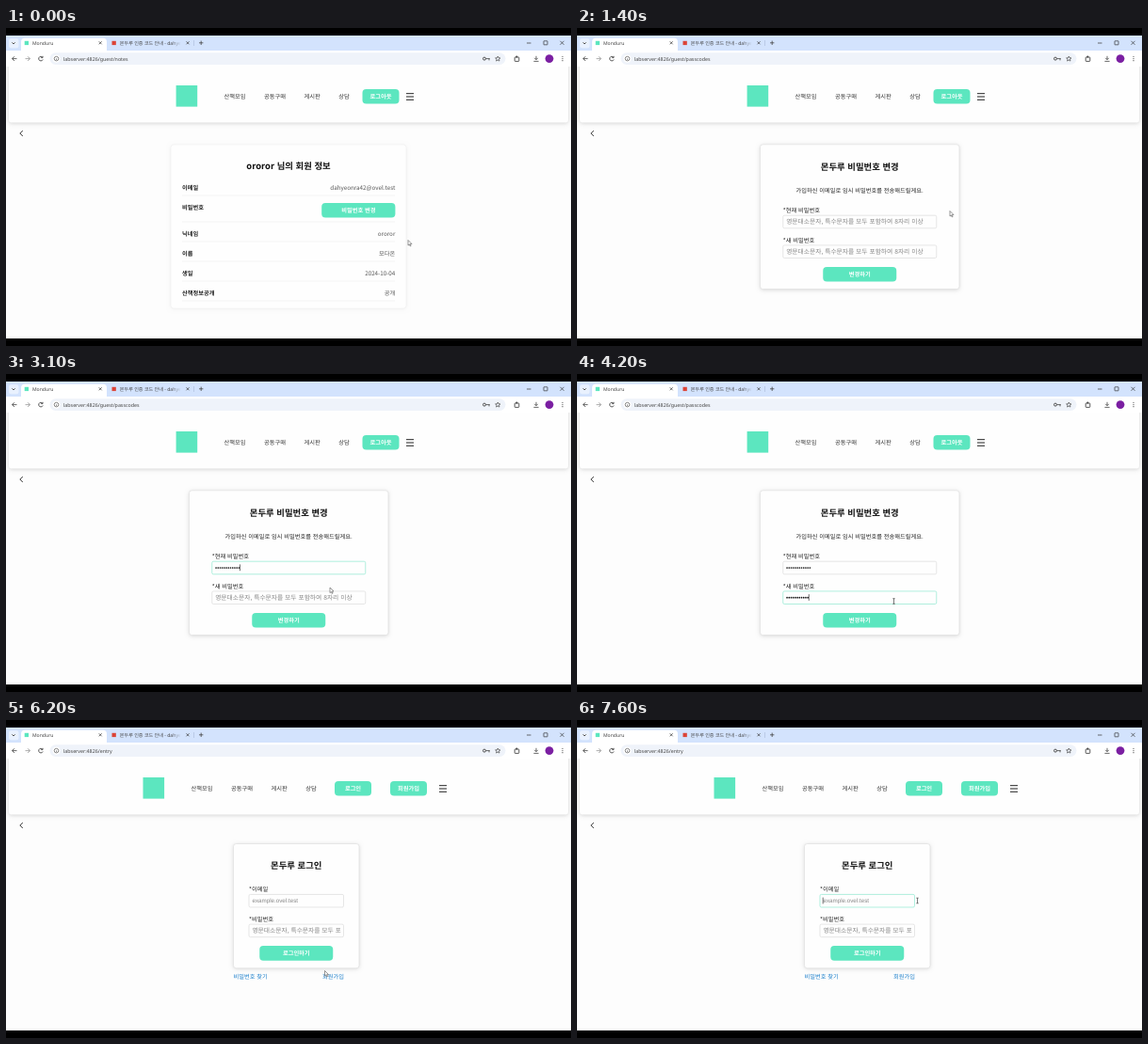
An HTML page with a canvas for the animation above (7700 ms loop, 600 by 338 pixels).

```html
<!DOCTYPE html>
<html lang="ko">
<head>
<meta charset="utf-8">
<style>
html, body { margin: 0; width: 100%; height: 100%; overflow: hidden; background: #000; }
canvas { display: block; width: 600px; height: 338px; }
</style>
</head>
<body>
<canvas id="stage"></canvas>
<script>
const W = 600, H = 338, LOOP = 7700, STEP = 100;
const KR = '"Noto Sans CJK KR", "Noto Sans CJK", sans-serif';
const UI = '"Noto Sans", "Noto Sans CJK KR", sans-serif';
const ARIAL = '"Liberation Sans", Arial, sans-serif';
const MINT = '#5ce6bf', FOCUS = '#8fe8d0', DARK = '#444', BASE = 6.25;
const BRAND = '몬두루';
const HINT = '영문대소문자, 특수문자를 모두 포함하여 8자리 이상';
const PAGE_AT = { password: 1200, login: 6200 };
const CLICK = { current: 2000, fresh: 3400, submit: 4900, email: 7300 };

const canvas = document.getElementById('stage');
const ctx = canvas.getContext('2d');
const dpr = window.devicePixelRatio || 1;
canvas.width = W * dpr;
canvas.height = H * dpr;

// Pointer moves: start, end, target x, target y
const HOME = [427, 225.5];
const MOVES = [
  [100, 700, 396, 194.5],
  [1600, CLICK.current, 345, 206],
  [2700, 3100, 344, 227],
  [3100, CLICK.fresh, 336.5, 241.5],
  [4300, 4800, 348, 258],
  [5100, 6000, 338.5, 266.5],
  [6900, CLICK.email, 361.5, 192]
];

const clamp = (v, max = 1) => Math.max(0, Math.min(max, v));
const ease = u => u * u * (3 - 2 * u);

function text(s, x, cy, o = {}) {
  const size = o.size || BASE;
  ctx.font = `${o.weight || 400} ${size}px ${o.font || KR}`;
  ctx.textAlign = o.align || 'left';
  ctx.fillStyle = o.color || '#333';
  ctx.fillText(s, x, cy + size * 0.36);
  return ctx.measureText(s).width;
}

function rect(x, y, w, h, color) {
  ctx.fillStyle = color;
  ctx.fillRect(x, y, w, h);
}

function paint(fill, stroke, width = 0.7) {
  if (fill) { ctx.fillStyle = fill; ctx.fill(); }
  if (stroke) { ctx.strokeStyle = stroke; ctx.lineWidth = width; ctx.stroke(); }
}

function round(x, y, w, h, r, fill, stroke, width) {
  ctx.beginPath();
  ctx.roundRect(x, y, w, h, r);
  paint(fill, stroke, width);
}

function circle(x, y, r, fill, stroke, width) {
  ctx.beginPath();
  ctx.arc(x, y, r, 0, Math.PI * 2);
  paint(fill, stroke, width);
}

function line(x1, y1, x2, y2, color = DARK, width = 0.8) {
  ctx.beginPath();
  ctx.moveTo(x1, y1);
  ctx.lineTo(x2, y2);
  paint(null, color, width);
}

// Open angle with its tip at x, y, facing dir (radians)
function chevron(x, y, r, dir, color = DARK, width = 0.9) {
  for (const side of [-0.75, 0.75]) {
    const a = dir + side * Math.PI;
    line(x, y, x + r * Math.cos(a), y + r * Math.sin(a), color, width);
  }
}

function cross(x, y, r) {
  line(x - r, y - r, x + r, y + r, '#333', 0.7);
  line(x - r, y + r, x + r, y - r, '#333', 0.7);
}

function star(x, y, r) {
  ctx.beginPath();
  for (let i = 0; i < 10; i++) {
    const a = (i / 5 - 0.5) * Math.PI, d = i % 2 ? r * 0.45 : r;
    ctx.lineTo(x + d * Math.cos(a), y + d * Math.sin(a));
  }
  ctx.closePath();
  paint(null, DARK);
}

function clipped(x, y, w, h, body) {
  ctx.save();
  ctx.beginPath();
  ctx.rect(x, y, w, h);
  ctx.clip();
  body();
  ctx.restore();
}

function panel(x, y, w, h, border, shade) {
  ctx.save();
  ctx.shadowColor = `rgba(0,0,0,${shade})`;
  ctx.shadowBlur = 4 * dpr;
  ctx.shadowOffsetY = 0.8 * dpr;
  round(x, y, w, h, 3, '#fefefe');
  ctx.restore();
  if (border) round(x, y, w, h, 3, null, border, 0.6);
}

function button(label, x, y, w) {
  round(x, y, w, 15.6, 4, MINT);
  text(label, x + w / 2, y + 7.8, { weight: 700, align: 'center', color: '#fff' });
}

function heading(s, x, y) {
  text(s, x, y, { size: 9.4, weight: 700, align: 'center', color: '#111' });
}

function tab(x, color, label) {
  rect(x + 4, 13.8, 4.3, 4.3, color);
  clipped(x, 10, 77, 13, () => text(label, x + 12.3, 16.2, { size: 5.1, font: UI, color: DARK }));
  cross(x + 84.5, 15.8, 1.5);
}

function tabStrip() {
  rect(0, 8, W, 16, '#d3e3fd');
  round(3, 11.3, 10.5, 10, 2.5, '#e9f1fe');
  chevron(8, 17, 2.3, Math.PI / 2);
  round(16, 10.8, 91, 17, 4, '#fff');
  tab(15.7, MINT, 'Monduru');
  tab(108.5, '#dc4437', BRAND + ' 인증 코드 안내 - dahye');
  const fade = ctx.createLinearGradient(176, 0, 186, 0);
  fade.addColorStop(0, 'rgba(211,227,253,0)');
  fade.addColorStop(1, '#d3e3fd');
  rect(176, 11, 10, 12, fade);
  line(199.5, 13, 199.5, 19, '#aabbd8', 0.6);
  line(205, 15.8, 209.4, 15.8);
  line(207.2, 13.6, 207.2, 18);
  line(553, 16, 557.5, 16);
  round(571, 13.8, 4, 4, 0.3, null, '#333');
  cross(590.5, 15.8, 2);
}

function toolbar(url) {
  const y = 32.6;
  rect(0, 24, W, 17, '#fff');
  line(6.6, y, 11.5, y);
  chevron(6.6, y, 3.2, Math.PI);
  line(20.5, y, 25.4, y, '#999');
  chevron(25.4, y, 3.2, 0, '#999');
  ctx.beginPath();
  ctx.arc(37, y, 2.3, 0.4, 5.5);
  paint(null, DARK, 0.9);
  chevron(39, y - 1, 1.8, Math.PI / 4);

  round(46.5, 26.3, 484, 12.6, 6.3, '#eff3fa');
  circle(53.5, y, 4.2, '#fff');
  circle(53.5, y, 2.3, null, '#555');
  line(53.5, y - 0.2, 53.5, y + 1.3, '#555', 0.7);
  text(url, 61, y + 0.1, { size: 5.3, font: UI, color: DARK });

  circle(508, y, 1.5, null, DARK, 0.9);
  line(509.5, y, 513.8, y);
  line(513, y, 513, y + 1.8);
  star(522.3, y + 0.2, 2.8);
  round(540.2, y - 1.6, 4.6, 4.4, 0.6, null, DARK, 0.9);
  circle(542.3, y - 2.1, 1, DARK);
  line(563, y - 2.8, 563, y + 1);
  chevron(563, y + 1, 2.4, Math.PI / 2);
  line(560.4, y + 2.8, 565.6, y + 2.8);
  circle(577, y, 4.4, '#7b1fa2');
  for (const dy of [-2.1, 0, 2.1]) circle(591, y + dy, 0.6, DARK);
}

function header(left, buttons, buttonX, menuX) {
  clipped(0, 41, W, 70, () => panel(3, 36, 594, 64.6, null, 0.16));
  rect(left, 61, 22.6, 22.6, MINT);
  let x = left + 51;
  for (const s of ['산책모임', '공동구매', '게시판', '상담']) {
    x += text(s, x, 73, { weight: 500 }) + 19.5;
  }
  buttons.forEach((s, i) => button(s, buttonX + i * 59, 65, 39));
  for (const dy of [-3.3, 0, 3.3]) line(menuX - 4, 73 + dy, menuX + 4, 73 + dy, '#222', 1);
  chevron(14.8, 112, 4.2, Math.PI, '#333', 1);
}

function page(path, member) {
  rect(0, 0, W, H, '#000');
  rect(0, 8, W, 322, '#fdfdfd');
  tabStrip();
  toolbar('labserver:4826/' + path);
  if (member) header(180.6, ['로그아웃'], 378.5, 429);
  else header(145.5, ['로그인', '회원가입'], 349, 464);
}

function field(x, y, w, o) {
  const h = 13.6, cy = y + h / 2 - 0.2, n = o.dots || 0, pitch = 2.21;
  round(x, y, w, h, 1.5, '#fefefe', o.focus ? FOCUS : '#dcdcdc');
  clipped(x + 3, y, w - 6, h, () => {
    for (let i = 0; i < n; i++) circle(x + 4.3 + i * pitch, cy + 0.2, 0.85, '#111');
    if (!n) text(o.hint || HINT, x + 3.4, cy, { size: o.size || 6.75, font: o.font, color: '#888' });
  });
  if (o.caret) {
    const cx = x + 3.2 + n * pitch;
    line(cx, cy - 3.4, cx, cy + 3.4, '#111', 0.6);
  }
}

// Card with two labelled inputs and a button, stacked from the first label down
function form(o) {
  const mid = o.x + o.w / 2, inset = (o.w - o.inputW) / 2;
  panel(o.x, o.top, o.w, o.first + 83.8 - o.top, '#dcdcdc', 0.15);
  heading(BRAND + o.title, mid, o.top + 23.4);
  o.inputs.forEach((input, i) => {
    const y = o.first + i * 31.7;
    text('*' + input.label, o.x + inset, y, { weight: 500, color: '#222' });
    field(o.x + inset, y + 5.4, o.inputW, input);
  });
  button(o.action, mid - 39, o.first + 60.1, 78);
}

function profilePage() {
  page('guest/notes', true);
  panel(175, 124, 250, 174, '#eee', 0.05);
  heading('ororor 님의 회원 정보', 300, 147);
  const rows = {
    '이메일': 'dahyeonra42@ovel.test', '비밀번호': '', '닉네임': 'ororor',
    '이름': '모다온', '생일': '2024-10-04', '산책정보공개': '공개'
  };
  let y = 170;
  for (const [label, value] of Object.entries(rows)) {
    text(label, 187, y, { weight: 700, color: '#222' });
    if (value) text(value, 413.3, y, { align: 'right', color: '#555' });
    else button('비밀번호 변경', 335.2, y - 5, 78.2);
    y += value ? 21 : 28;
    line(187, y - 13, 413, y - 13, '#ebebeb', 0.6);
  }
}

// Keys pressed so far in a burst of n between two times
const typed = (t, from, to, n) => Math.floor(n * clamp((t - from) / (to - from)));
const blink = (t, since) => t < since || (t - since) % 1000 < 500;

function passwordPage(t) {
  page('guest/passcodes', true);
  const first = t >= CLICK.current && t < CLICK.fresh;
  const second = t >= CLICK.fresh && t < CLICK.submit;
  form({
    x: 194.5, w: 211.5, top: 123.8, first: 193.8, inputW: 163,
    title: ' 비밀번호 변경', action: '변경하기',
    inputs: [
      {
        label: '현재 비밀번호', focus: first, caret: first && blink(t, 3000),
        dots: typed(t, 2050, 2400, 6) + typed(t, 2650, 3000, 6)
      },
      {
        label: '새 비밀번호', focus: second, caret: second && blink(t, 4300),
        dots: typed(t, 3450, 4300, 13)
      }
    ]
  });
  text('가입하신 이메일로 임시 비밀번호를 전송해드릴게요.', 300, 172.3,
    { weight: 500, align: 'center', color: '#222' });
}

function loginPage(t) {
  page('entry', false);
  const focus = t >= CLICK.email;
  form({
    x: 241.5, w: 133.5, top: 131.5, first: 180, inputW: 100.5,
    title: ' 로그인', action: '로그인하기',
    inputs: [
      {
        label: '이메일', hint: 'example.ovel.test', font: ARIAL, size: BASE,
        focus, caret: focus && blink(t, CLICK.email)
      },
      { label: '비밀번호' }
    ]
  });
  text('비밀번호 찾기', 241.5, 272.7, { color: '#1b7fcb' });
  text('회원가입', 336, 272.7, { color: '#1b7fcb' });
}

function pointerAt(t) {
  let [x, y] = HOME;
  for (const [from, to, tx, ty] of MOVES) {
    const k = ease(clamp((t - from) / (to - from)));
    x += (tx - x) * k;
    y += (ty - y) * k;
  }
  return [x, y];
}

function beam(x, y) {
  line(x, y - 2.8, x, y + 2.8, DARK, 0.7);
  for (const dy of [-2.8, 2.8]) line(x - 1.2, y + dy, x + 1.2, y + dy, DARK, 0.7);
}

function arrow(x, y) {
  ctx.save();
  ctx.translate(x, y);
  paintArrow();
  ctx.restore();
}

function paintArrow() {
  ctx.beginPath();
  ctx.moveTo(0, 0);
  ctx.lineTo(0, 5.6);
  ctx.lineTo(1.3, 4.4);
  ctx.lineTo(2.2, 6.4);
  ctx.lineTo(3.1, 6);
  ctx.lineTo(2.2, 4.1);
  ctx.lineTo(4, 4);
  ctx.closePath();
  paint('#fff', '#555', 0.6);
}

function draw(t) {
  ctx.setTransform(dpr, 0, 0, dpr, 0, 0);
  ctx.textRendering = 'geometricPrecision';
  if (t < PAGE_AT.password) profilePage();
  else if (t < PAGE_AT.login) passwordPage(t);
  else loginPage(t);

  const [x, y] = pointerAt(t);
  const within = (top, right) => x < right && y > top && y < top + 13.6;
  const overInput = t < PAGE_AT.login
    ? t >= PAGE_AT.password && (within(199.2, 385) || within(230.9, 385))
    : within(185.4, 362) || within(217.1, 362);
  (overInput ? beam : arrow)(x, y);
}

const start = performance.now();
function tick() {
  const t = (performance.now() - start) % LOOP;
  draw(Math.floor(t / STEP) * STEP);
  requestAnimationFrame(tick);
}
tick();
</script>
</body>
</html>
```
